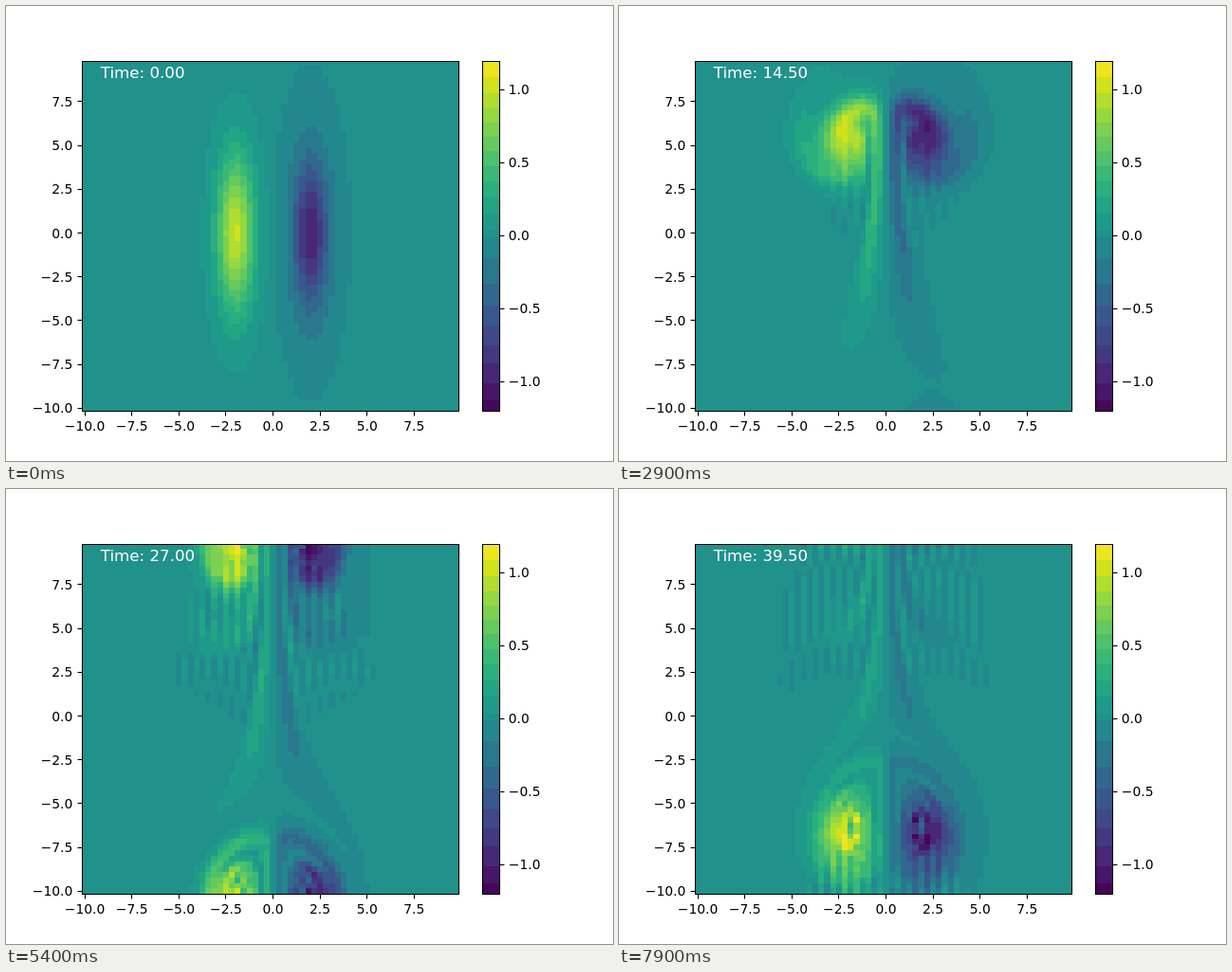
Write an HTML page with a canvas that moves like this. It is 640x480 px and loops after 8 s.

```html
<!DOCTYPE html>
<html lang="en">
<head>
<meta charset="utf-8">
<title>Vortex dipole</title>
<style>
  html, body { margin: 0; width: 100%; height: 100%; overflow: hidden; background: #fff; }
  canvas, svg { position: absolute; left: 0; top: 0; width: 640px; height: 480px; }
  text { font: 13.89px "DejaVu Sans", sans-serif; }
  #clock { font-size: 16.67px; fill: #fff; }
  path { fill: none; stroke: #000; stroke-width: 1.1; }
</style>
</head>
<body>
<canvas id="field" width="640" height="480"></canvas>
<svg id="axes" viewBox="0 0 640 480"><text id="clock" x="99.8" y="76"></text></svg>
<script>
// Vorticity w on a periodic grid: w_t + psi_x w_y - psi_y w_x = nu lap(w), lap(psi) = w
const N = 64, SIZE = N * N, H = 20 / N, NU = 0.001;
const FRAMES = 80, FRAME_MS = 100, FRAME_DT = 0.5, STEPS = 2;
const LEFT = 80, RIGHT = 476.8, TOP = 57.6, BOTTOM = 427.2;
const BAR_LEFT = 502, BAR_RIGHT = 520, V_MAX = 1.2;

const ctx = document.getElementById('field').getContext('2d');
const axes = document.getElementById('axes');
const clock = document.getElementById('clock');

// Hartley basis diagonalises the periodic Laplacian with real numbers only
const basis = Float64Array.from({ length: SIZE }, (_, i) => {
  const a = 2 * Math.PI * (Math.floor(i / N) * (i % N) % N) / N;
  return Math.cos(a) + Math.sin(a);
});
const waveSq = Array.from({ length: N }, (_, j) => (Math.min(j, N - j) * Math.PI / 10) ** 2);
const inverse = Float64Array.from({ length: SIZE }, (_, i) =>
  i ? -1 / ((waveSq[Math.floor(i / N)] + waveSq[i % N]) * SIZE) : 0);

// Transposed product (a * basis)^T; applied twice it transforms both directions
function project(a) {
  const out = new Float64Array(SIZE);
  for (let i = 0; i < N; i++) {
    for (let j = 0; j < N; j++) {
      let sum = 0;
      for (let k = 0; k < N; k++) sum += a[i * N + k] * basis[j * N + k];
      out[j * N + i] = sum;
    }
  }
  return out;
}
const hartley = a => project(project(a));
const streamFunction = w => hartley(hartley(w).map((v, i) => v * inverse[i]));

function rate(w) {
  const psi = streamFunction(w), out = new Float64Array(SIZE);
  for (let r = 0; r < N; r++) {
    const up = (r + 1) % N * N, down = (r + N - 1) % N * N, row = r * N;
    for (let c = 0; c < N; c++) {
      const e = row + (c + 1) % N, l = row + (c + N - 1) % N;
      const n = up + c, s = down + c, i = row + c;
      const advection = (psi[e] - psi[l]) * (w[n] - w[s]) - (psi[n] - psi[s]) * (w[e] - w[l]);
      const laplacian = w[e] + w[l] + w[n] + w[s] - 4 * w[i];
      out[i] = (NU * laplacian - advection / 4) / (H * H);
    }
  }
  return out;
}

function rungeKutta(w, dt) {
  const shift = (k, h) => w.map((v, i) => v + h * k[i]);
  const a = rate(w), b = rate(shift(a, dt / 2)), c = rate(shift(b, dt / 2)), d = rate(shift(c, dt));
  return w.map((v, i) => v + dt / 6 * (a[i] + 2 * b[i] + 2 * c[i] + d[i]));
}

const states = [Float64Array.from({ length: SIZE }, (_, i) => {
  const x = -10 + H * (i % N), y = -10 + H * Math.floor(i / N);
  return Math.exp(-((x + 2) ** 2) - y * y / 20) - Math.exp(-((x - 2) ** 2) - y * y / 20);
})];

function stateAt(frame) {
  while (states.length <= frame) {
    let w = states[states.length - 1];
    for (let s = 0; s < STEPS; s++) w = rungeKutta(w, FRAME_DT / STEPS);
    states.push(w);
  }
  return states[frame];
}

// Colour bands, as edges on a 0..256 scale
const edges = [0, 8, 20, 35, 48, 62, 77, 93, 112, 127, 132, 144, 156, 168, 179, 190, 200, 211, 221, 232, 244, 256];
const viridis = ('440154 481a6c 472f7d 414487 39568c 31688e 2a788e 23888e ' +
  '1f988b 22a884 35b779 54c568 7ad151 a5db36 d2e21b fde725').split(' ')
  .map(hex => [0, 2, 4].map(i => parseInt(hex.slice(i, i + 2), 16)));

function viridisAt(u) {
  const p = u * 15, i = Math.min(14, Math.floor(p));
  return `rgb(${viridis[i].map((v, k) => Math.round(v + (viridis[i + 1][k] - v) * (p - i)))})`;
}
const bands = edges.slice(1).map((e, i) => viridisAt((e + edges[i]) / 512));

function colourOf(v) {
  const level = (v / V_MAX + 1) * 128;
  let b = 0;
  while (b < bands.length - 1 && level >= edges[b + 1]) b++;
  return bands[b];
}

function fillBox(x0, y0, x1, y1, colour) {
  const x = Math.round(x0), y = Math.round(y0);
  ctx.fillStyle = colour;
  ctx.fillRect(x, y, Math.round(x1) - x, Math.round(y1) - y);
}

const colX = c => LEFT + c * (RIGHT - LEFT) / N;
const rowY = r => BOTTOM - r * (BOTTOM - TOP) / N;

function drawFrame(frame) {
  const w = stateAt(frame);
  for (let r = 0; r < N; r++) {
    for (let c = 0; c < N; c++) {
      fillBox(colX(c), rowY(r + 1), colX(c + 1), rowY(r), colourOf(w[r * N + c]));
    }
  }
  clock.textContent = 'Time: ' + (frame * FRAME_DT).toFixed(2);
}

function add(tag, attrs, text = '') {
  const el = document.createElementNS('http://www.w3.org/2000/svg', tag);
  for (const key in attrs) el.setAttribute(key, attrs[key]);
  el.textContent = text;
  axes.append(el);
}
const line = d => add('path', { d });
const label = (x, y, anchor, v) =>
  add('text', { x, y, 'text-anchor': anchor }, v.toFixed(1).replace('-', '\u2212'));
const snap = v => Math.floor(v) + 0.5;

function drawAxes() {
  line('M80.5 58.5H477.5V427.5H80.5Z');
  line('M502.5 58.5H520.5V427.5H502.5Z');
  for (let v = -10; v <= 7.5; v += 2.5) {
    const cell = (v + 10) / H + 0.5, x = colX(cell), y = rowY(cell);
    line(`M${snap(x)} 427.5v5`);
    label(x, 448, 'middle', v);
    line(`M80.5 ${snap(y)}h-5`);
    label(70.3, Math.round(y + 5), 'end', v);
  }
  const barY = v => (TOP + BOTTOM - v / V_MAX * (BOTTOM - TOP)) / 2;
  for (let v = -1; v <= 1; v += 0.5) {
    line(`M520.5 ${snap(barY(v))}h5`);
    label(529.8, Math.round(barY(v) + 5), 'start', v);
  }
  bands.forEach((colour, i) => {
    const level = e => barY((e / 128 - 1) * V_MAX);
    fillBox(BAR_LEFT, level(edges[i + 1]), BAR_RIGHT, level(edges[i]), colour);
  });
}

let shown = -1;
function tick() {
  const frame = Math.floor(performance.now() / FRAME_MS) % FRAMES;
  if (frame !== shown) drawFrame(shown = frame);
  requestAnimationFrame(tick);
}

drawAxes();
tick();
</script>
</body>
</html>
```
